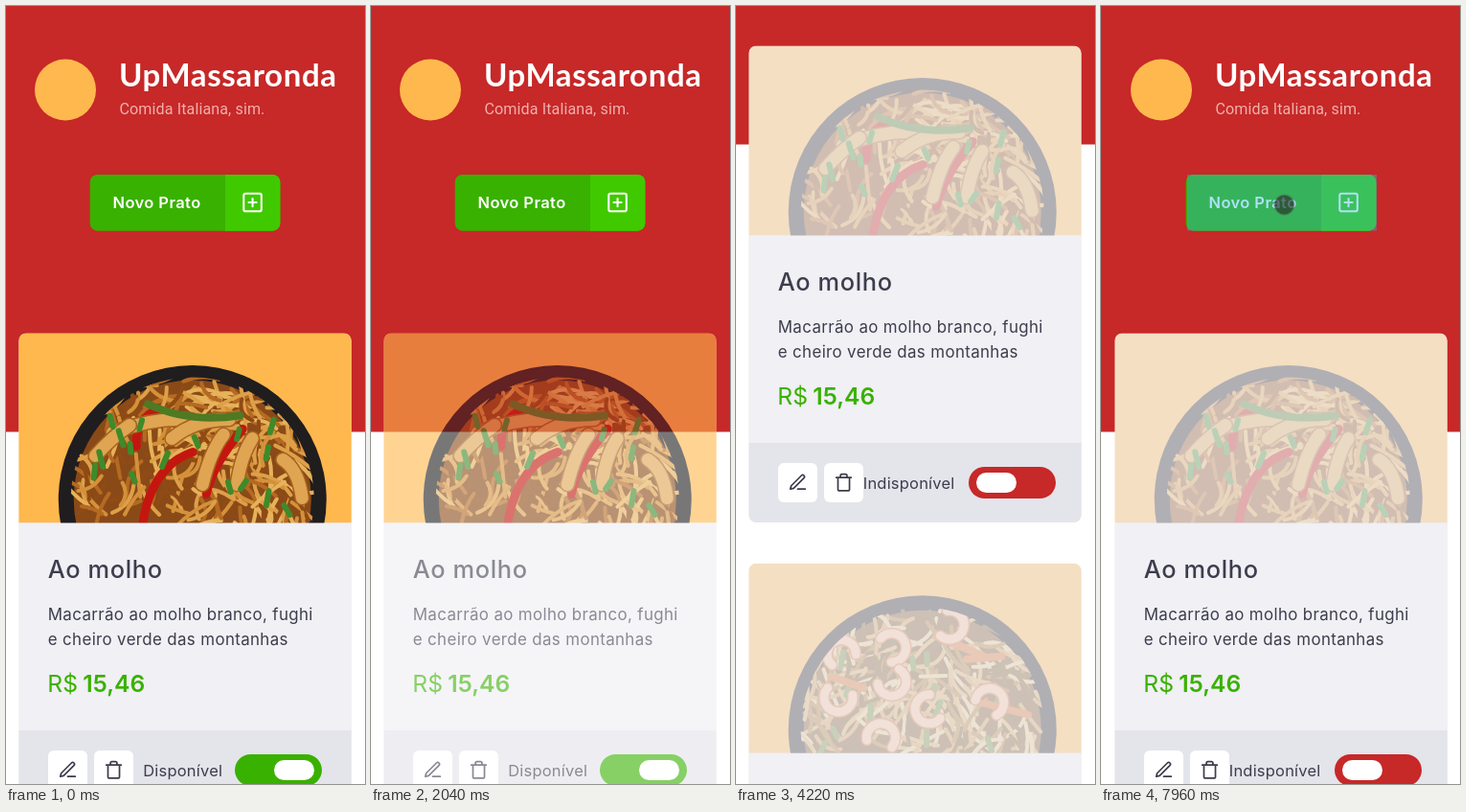
Write an HTML page that moves like this. It is 375 px wide and 812 px high and loops after 8 s.

```html
<!DOCTYPE html>
<html lang="pt">
<head>
<meta charset="utf-8">
<title>Cardápio</title>
<style>
html, body { margin: 0; width: 100%; height: 100%; overflow: hidden; background: #fff; }
svg { display: block; width: 375px; height: 812px; }
text { font-family: Inter, sans-serif; fill: #3d3d4d; white-space: pre; }
.brand { font: 700 33px Lato, sans-serif; letter-spacing: .6px; fill: #fff; }
.tag { font: 16.1px Roboto, sans-serif; letter-spacing: .1px; fill: #efb0ac; }
.btn { font-size: 16.5px; font-weight: 600; letter-spacing: .4px; fill: #fff; }
.name { font-size: 25.4px; font-weight: 500; letter-spacing: .65px; }
.desc { font-size: 16.9px; letter-spacing: .36px; }
.price { font-size: 24.7px; fill: #39b100; }
.price .sum { font-weight: 600; }
.label { font-size: 16.5px; letter-spacing: .2px; }
.status { font: 12px "Noto Sans", sans-serif; fill: #fff; }
.icon { fill: none; stroke: #3d3d4d; stroke-width: 2; stroke-linecap: round; stroke-linejoin: round; }
.line { fill: none; stroke-linecap: round; }
.tap { fill: #33b5e5; opacity: .4; }
</style>
</head>
<body>
<svg viewBox="0 0 375 812">
  <defs>
    <clipPath id="bowl"><circle cx="181.500" cy="173" r="127"/></clipPath>
    <path id="pen" d="M12 20h9M16.5 3.5a2.12 2.12 0 0 1 3 3L7 19l-4 1 1-4z"/>
    <path id="bin" d="M3 6h18M19 6v14a2 2 0 0 1-2 2H7a2 2 0 0 1-2-2V6m3 0V4a2 2 0 0 1 2-2h4a2 2 0 0 1 2 2v2"/>
    <path id="plus" d="M5 3h14a2 2 0 0 1 2 2v14a2 2 0 0 1-2 2H5a2 2 0 0 1-2-2V5a2 2 0 0 1 2-2zM12 8v8M8 12h8"/>
  </defs>
  <rect width="375" height="812" fill="#fff"/>
  <g id="page">
    <rect id="red" x="-2" width="380" fill="#c72828"/>
    <g id="head">
      <circle cx="62" cy="87.500" r="32" fill="#ffb84d"/>
      <text class="brand" x="118" y="84">UpMassaronda</text>
      <text class="tag" x="118.500" y="113">Comida Italiana, sim.</text>
      <rect x="87.700" y="176" width="198.700" height="58.700" rx="8" fill="#39b100"/>
      <path d="M229 176h49.400a8 8 0 0 1 8 8v42.700a8 8 0 0 1-8 8H229z" fill="#41c900"/>
      <text class="btn" x="111.500" y="211">Novo Prato</text>
      <use href="#plus" class="icon" style="stroke:#fff" transform="translate(245.200 192.700) scale(1.03)"/>
      <rect id="tapBtn" class="tap" x="89" y="176" width="198" height="58.500"/>
    </g>
    <g id="cards"></g>
    <rect id="tapSwitch" class="tap" x="239" y="781" width="91" height="34"/>
  </g>
  <g id="dot">
    <circle r="10" fill="#201818" fill-opacity=".56" stroke="#505050" stroke-opacity=".4" stroke-width="2"/>
  </g>
  <g id="bars" fill="#808080">
    <rect id="vbar" x="368" width="3" rx="1"/>
    <rect x="10" y="805" width="348" height="3" rx="1"/>
  </g>
  <g id="status">
    <path d="M0 792h119a4 4 0 0 1 4 4v16H0z" fill="#0f3a55"/>
    <text class="status" x="5" y="806">Connecting...</text>
  </g>
</svg>
<script>
const $ = id => document.getElementById(id);
const set = (el, attrs) => { for (const k in attrs) el.setAttribute(k, attrs[k]); };
const show = (id, on) => { $(id).style.display = on ? '' : 'none'; };

function seeded(s) {
  return () => (s = (s * 16807) % 2147483647) / 2147483647;
}

const line = (d, color, w) => `<path class="line" d="${d}" stroke="${color}" stroke-width="${w}"/>`;
const strip = (d, color, edge, w) => line(d, edge, w + 3) + line(d, color, w);

// Curved strands that bend around the middle of the bowl
function noodles(seed, colors) {
  const rnd = seeded(seed);
  let out = '';
  for (let i = 0; i < 240; i++) {
    const x = 56 + rnd() * 250, y = 48 + rnd() * 150;
    const turn = Math.atan2(y - 173, x - 181) + Math.PI / 2 + (rnd() - .5) * 2.2;
    const len = 22 + rnd() * 28, bend = (rnd() - .5) * 26;
    const c = Math.cos(turn), s = Math.sin(turn);
    const at = (u, v) => `${(u * c - v * s).toFixed(1)} ${(u * s + v * c).toFixed(1)}`;
    out += line(`M${x.toFixed(1)} ${y.toFixed(1)}q${at(len / 2, bend)} ${at(len, 0)}`, colors[i % colors.length], 4);
  }
  return out;
}

function herbs(seed, n, color) {
  const rnd = seeded(seed);
  let out = '';
  for (let i = 0; i < n; i++) {
    const x = 80 + rnd() * 200, y = 85 + rnd() * 105;
    out += line(`M${x.toFixed(1)} ${y.toFixed(1)}l${(rnd() * 12 - 6).toFixed(1)} ${(8 + rnd() * 8).toFixed(1)}`, color, 6);
  }
  return out;
}

function chickenDish() {
  const meat = d => strip(d, '#dfa552', '#a5621f', 13);
  return noodles(71, ['#d4913a', '#e6b25a', '#b56a22', '#dda048', '#8f4a15']) +
    line('M123 118q-2-30 24-38M130 196q10-58 52-72M196 168q6-30 38-68', '#c4160f', 9) +
    meat('M98 104q40-16 82-14') + meat('M160 110q24-20 60-20') +
    meat('M192 158q8-34 22-52') + meat('M228 158q4-30 16-48') + meat('M80 128q18-20 36-32') +
    meat('M276 132q16 10 20 40') +
    line('M135 74q42 20 96 12', '#4d7a22', 8) + herbs(19, 16, '#3f8a2a');
}

function shrimpDish() {
  const shrimp = (x, y, a) => `<g transform="translate(${x} ${y}) rotate(${a})">` +
    strip('M-14 10a15 15 0 1 1 27-2', '#f3bf96', '#d3713f', 9) + '</g>';
  return noodles(37, ['#d9ad62', '#e8cb8e', '#b07a34', '#cf9c50', '#7d5a26']) +
    herbs(53, 14, '#6f8a35') +
    line('M86 118l34 12M196 76l48 20M228 100l36-3M246 146l46 12', '#d9702d', 8) +
    [[97, 92, -20], [152, 88, 70], [92, 142, 200], [150, 126, 150], [212, 66, 110],
     [254, 144, 40], [186, 152, 250], [140, 180, 20]].map(p => shrimp(...p)).join('');
}

function card(id, y, name, desc, sum, base, dish) {
  const low = 26 * (desc.length - 2), foot = 414.5 + low, h = foot + 83;
  const button = (x, icon) =>
    `<rect x="${x}" y="${foot + 21}" width="41" height="41" rx="6" fill="#fff"/>` +
    `<use href="#${icon}" class="icon" transform="translate(${x + 10.2} ${foot + 31}) scale(.86)"/>`;
  return `<g id="${id}" transform="translate(13.250 ${y})">
    <clipPath id="${id}Clip"><rect width="347.500" height="${h}" rx="8"/></clipPath>
    <g clip-path="url(#${id}Clip)">
      <rect width="348" height="${h}" fill="#f0f0f5"/>
      <g id="${id}Photo">
        <rect width="348" height="198" fill="#ffb84d"/>
        <circle cx="181.500" cy="173.500" r="140" fill="#201d1f"/>
        <g clip-path="url(#bowl)"><circle cx="181.500" cy="173" r="124" fill="${base}"/>${dish}</g>
      </g>
      <path d="M0 198h348v${foot - 198}H0z" fill="#f0f0f5"/>
      <path d="M0 ${foot}h348v83H0z" fill="#e4e4eb"/>
      <text class="name" x="30.500" y="255.500">${name}</text>
      ${desc.map((s, i) => `<text class="desc" x="30.500" y="${299.5 + 26 * i}">${s}</text>`).join('')}
      <text class="price" y="${374.5 + low}"><tspan x="30">R$</tspan><tspan class="sum" x="67">${sum}</tspan></text>
      ${button(30.75, 'pen')}${button(78.75, 'bin')}
      <text id="${id}Label" class="label" y="${foot + 48}"></text>
      <rect id="${id}Track" y="${foot + 25}" width="91" height="33" rx="16.500"/>
      <rect id="${id}Knob" y="${foot + 31}" width="42" height="21" rx="10.500" fill="#fff"/>
    </g></g>`;
}

$('cards').innerHTML =
  card('a', 341.5, 'Ao molho', ['Macarrão ao molho branco, fughi', 'e cheiro verde das montanhas'],
    '15,46', '#8a4a17', chickenDish()) +
  card('b', 881.75, 'A la Camarón', ['Macarrão com vegetais de', 'primeira linha e camarão dos 7', 'mares.'],
    '25.90', '#7d5526', shrimpDish());

// off: 0 = available, 1 = unavailable
function toggle(id, off) {
  const x = off > 0 ? 229.75 : 225.75;
  const mix = (p, q) => Math.round(p + (q - p) * off);
  $(id + 'Photo').setAttribute('opacity', 1 - .7 * off);
  $(id + 'Label').textContent = off > 0 ? 'Indisponível' : 'Disponível';
  set($(id + 'Label'), { x: off > 0 ? 119.5 : 130 });
  set($(id + 'Track'), { x, fill: `rgb(${mix(57, 199)},${mix(177, 40)},${mix(0, 40)})` });
  set($(id + 'Knob'), { x: x + 41 - 33 * off });
}

// Held steps: n changes from a to b, reaching 1 at b
function steps(t, a, b, n) {
  if (t < a) return 0;
  return Math.min(1, (Math.floor((t - a) / (b - a) * (n - 1) + .01) + 1) / n);
}
const within = (t, a, b) => t >= a && t < b;
const ease = p => p * p * (3 - 2 * p);

function scrollAt(t) {
  if (t >= 7260) return 0;
  if (t >= 6020) return 67;
  return 200 * ease(steps(t, 2270, 2680, 6)) + 100 * steps(t, 2820, 2890, 2) +
    333 * steps(t, 4380, 4530, 3);
}

// [shown, first fade, gone]
const barTimes = [[730, 1120, 1280], [2270, 3210, 3370], [4380, 4940, 5090], [7260, 7580, 7740]];
// [from, to, x, y]
const touches = [[3760, 4140, 254.5, 501.5], [4380, 4940, 121.5, 446.5], [6020, 6420, 113, 732],
  [6880, 7260, 180.5, 520.5], [7880, 8000, 191.5, 207.5]];

function draw(t) {
  const y = scrollAt(t), loading = within(t, 730, 1430);
  const height = loading ? 834 : t < 6020 ? 1445 : 879;

  $('page').setAttribute('transform', `translate(${t >= 6020 ? 1 : 0} ${-y})`);
  show('red', !within(t, 730, 1120));
  $('red').setAttribute('height', loading ? 385 : 444.5);
  show('head', !loading);
  show('b', t < 6020);
  $('cards').setAttribute('opacity', t < 730 ? 1 : steps(t, 1870, 2200, 5));
  toggle('a', t < 730 ? 0 : steps(t, 3930, 4220, 5));
  show('tapSwitch', within(t, 3760, 3930));
  show('tapBtn', t >= 7880);
  show('status', within(t, 190, 1430));

  const touch = touches.find(([a, b]) => within(t, a, b));
  show('dot', touch);
  if (touch) $('dot').setAttribute('transform', `translate(${touch[2]} ${touch[3]})`);

  const bar = barTimes.find(([a, , c]) => within(t, a, c));
  show('bars', bar);
  if (bar) {
    $('bars').setAttribute('opacity', .52 * (1 - steps(t, bar[1], bar[2], 3)));
    set($('vbar'), { y: 5 + y / height * 794, height: 812 / height * 794 });
  }
}

toggle('b', 1);
const start = performance.now();
function tick() {
  draw((performance.now() - start) % 8000);
  requestAnimationFrame(tick);
}
draw(0);
requestAnimationFrame(tick);
</script>
</body>
</html>
```
